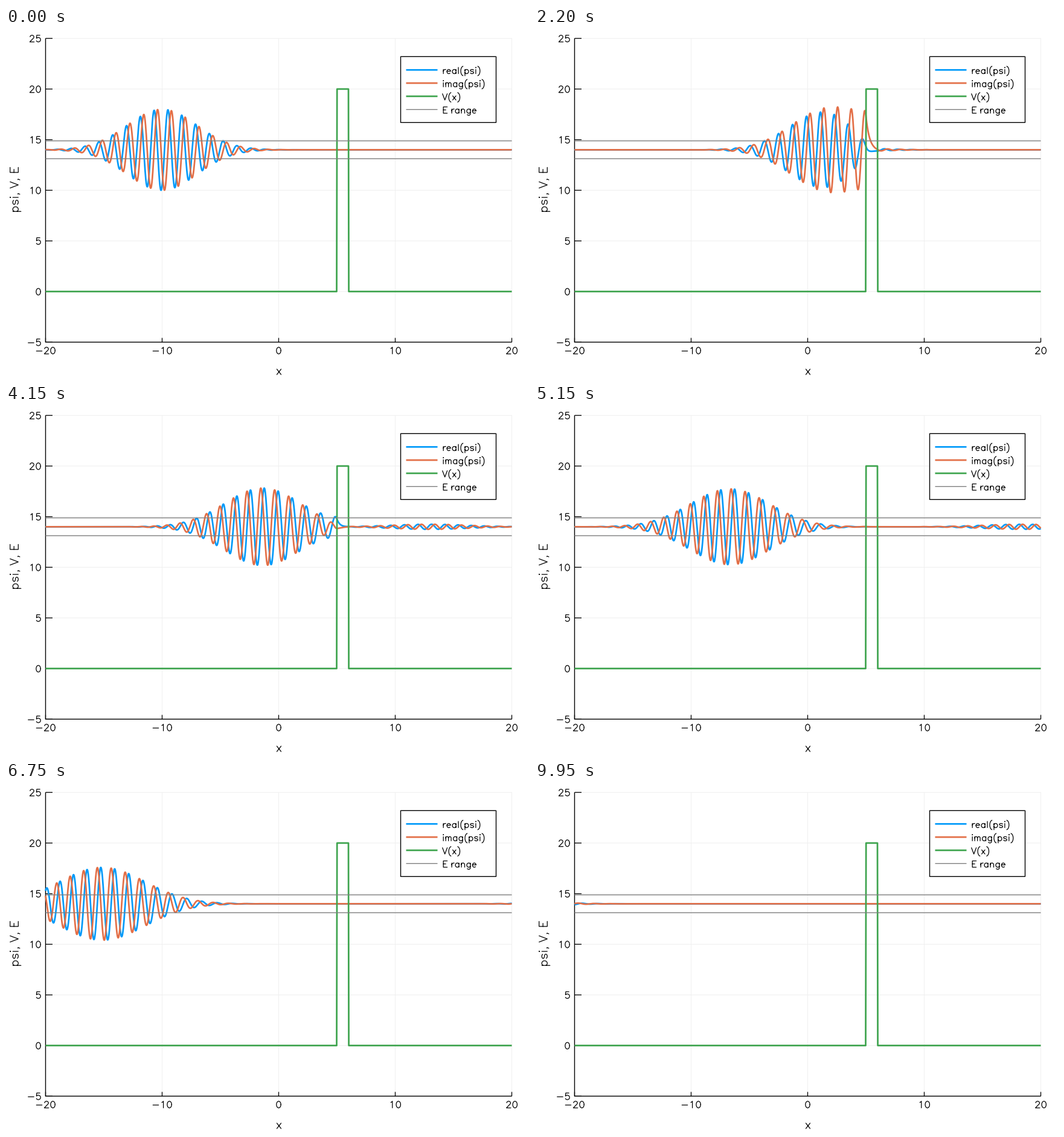
A matplotlib script for the animation above (10000 ms loop, 866 by 577 pixels).

```python
import numpy as np
import matplotlib.pyplot as plt
from matplotlib.animation import FuncAnimation
from matplotlib.patches import Rectangle

plt.rcParams["path.snap"] = False   # keep sub-pixel positions

W, H, DPI = 866, 577, 64
PX = 72 / DPI                       # points per pixel
LEFT, RIGHT, TOP, BOTTOM = 65.5, 837.5, 17.2, 519.4
BLUE, ORANGE, GREEN, GRAY = "#009afa", "#e36f47", "#3ea44e", "#808080"
TICK, LEGEND, GUIDE = 0.525, 0.497, 0.645   # lettering scales
FRAMES, STEP_MS, DT = 200, 50, 0.05

# physics, with hbar = m = 1
E0, V0, B0, B1 = 14, 20, 5, 6
START, SIGMA, AMP = -10, 3, 4
K0 = np.sqrt(2 * E0)
E_SPREAD = K0 / (2 * SIGMA)


# --- single-stroke lettering: baseline 0, x-height 14, cap height 21 ---
def line(*pts):
    return np.array(pts, float)


def arc(cx, cy, rx, ry, a0, a1):
    a = np.radians(np.linspace(a0, a1, 25))
    return np.column_stack([cx + rx * np.cos(a), cy + ry * np.sin(a)])


def join(*parts):
    return np.vstack(parts)


STEM = line((4, 14), (4, 0))
BOWL = arc(9.5, 7, 6.5, 7, 32, 328)

# character: (advance, strokes)
GLYPHS = {
    " ": (9, []),
    "0": (20, [arc(10, 10.5, 7, 10.5, 0, 360)]),
    "1": (20, [line((6, 17), (8, 18), (11, 21), (11, 0))]),
    "2": (20, [join(arc(10, 15.5, 6, 5.5, 175, -35), line((3, 0), (17, 0)))]),
    "5": (20, [join(line((15, 21), (5, 21), (4, 12)),
                    arc(10, 7, 7, 7, 140, -150))]),
    "-": (26, [line((4, 9), (22, 9))]),
    ",": (10, [line((4.5, 1), (5.5, 1), (5.5, -1), (4, -4))]),
    "(": (14, [arc(13, 9, 9, 16, 100, 260)]),
    ")": (14, [arc(1, 9, 9, 16, 80, -80)]),
    "a": (19, [line((15, 14), (15, 0)), BOWL]),
    "e": (18, [join(line((3, 8), (15, 8)), arc(9, 7, 6, 7, 8, 312))]),
    "g": (19, [join(line((15, 14)), arc(9.5, -2, 5.5, 5, 0, -150)), BOWL]),
    "i": (8, [STEM, arc(4, 20.3, 0.7, 0.7, 0, 360)]),
    "l": (8, [line((4, 21), (4, 0))]),
    "m": (26, [STEM, join(arc(8.5, 9, 4.5, 5, 180, 0), line((13, 0))),
               join(arc(17.5, 9, 4.5, 5, 180, 0), line((22, 0)))]),
    "n": (19, [STEM, join(arc(9.5, 8.5, 5.5, 5.5, 180, 0), line((15, 0)))]),
    "p": (19, [line((4, 14), (4, -7)), arc(9.5, 7, 6.5, 7, 148, -148)]),
    "r": (13, [STEM, arc(11, 8, 7, 6, 180, 80)]),
    "s": (17, [join(arc(8.5, 10.7, 5.5, 3.3, 20, 250),
                    arc(8.5, 3.7, 5.5, 3.7, 70, -160))]),
    "x": (17, [line((3, 14), (14, 0)), line((14, 14), (3, 0))]),
    "E": (19, [line((17, 21), (4, 21), (4, 0), (17, 0)),
               line((4, 11), (12, 11))]),
    "V": (18, [line((1, 21), (9, 0), (17, 21))]),
}


def text(x, y, s, scale, align=0.0, upright=False):
    """Draw s with its baseline at (x, y); align 0 left, 0.5 centre, 1 right."""
    pos = -align * sum(GLYPHS[c][0] for c in s)
    pts = []
    for c in s:
        advance, strokes = GLYPHS[c]
        for part in strokes:
            pts += [part + (pos, 0), [(np.nan, np.nan)]]
        pos += advance
    u, v = np.vstack(pts).T * scale
    xs, ys = (x - v, y - u) if upright else (x + u, y - v)
    ax.plot(xs, ys, color="black", lw=1.25 * PX, solid_capstyle="round",
            solid_joinstyle="round", zorder=6)


# --- plot coordinates to pixels ---
def sx(x):
    return LEFT + (np.asarray(x) + 20) * (RIGHT - LEFT) / 40


def sy(y):
    return BOTTOM - (np.asarray(y) + 5) * (BOTTOM - TOP) / 30


def stroke(xs, ys, color, width, z):
    return ax.plot(xs, ys, color=color, lw=width * PX, zorder=z,
                   solid_capstyle="butt", solid_joinstyle="round")[0]


def packet():
    """Wave packet at the barrier, summed over scattering states."""
    k = np.linspace(K0 - 1.5, K0 + 1.5, 301)
    q = np.sqrt(2 * V0 - k**2 + 0j)
    width = B1 - B0
    inner = np.cosh(q * width) - 1j * k / q * np.sinh(q * width)
    slope = -q * np.sinh(q * width) + 1j * k * np.cosh(q * width)
    arrive = np.exp(1j * k * B0)
    passed = 2 * arrive / (inner + slope / (1j * k))
    bounced = passed * inner - arrive

    col = x[:, None]
    u = np.clip(col, B0, B1) - B1
    states = np.where(
        col < B0,
        np.exp(1j * k * col) + bounced * np.exp(-1j * k * (col - B0)),
        np.where(col > B1,
                 passed * np.exp(1j * k * (col - B1)),
                 passed * (np.cosh(q * u) + 1j * k / q * np.sinh(q * u))))
    d = k - K0
    weight = (AMP * SIGMA / np.sqrt(2 * np.pi) * (k[1] - k[0])
              * np.exp(-(SIGMA * d)**2 / 2 - 1j * d * START))
    t = np.arange(FRAMES) * DT
    return states @ (weight[:, None] * np.exp(-0.5j * k[:, None]**2 * t))


fig = plt.figure(figsize=(W / DPI, H / DPI), dpi=DPI, facecolor="white")
ax = fig.add_axes([0, 0, 1, 1])
ax.set_xlim(0, W)
ax.set_ylim(H, 0)
ax.axis("off")

# grid, ticks and tick labels
for v in range(-20, 21, 10):
    p = sx(v)
    if v > -20:
        stroke([p, p], [TOP, BOTTOM], "#efefef", 1, 0)
    stroke([p, p], [BOTTOM, BOTTOM - 7], "black", 1.3, 1)
    text(p, 538.8, str(v), TICK, 0.5)
for v in range(-5, 26, 5):
    p = sy(v)
    if v > -5:
        stroke([LEFT, RIGHT], [p, p], "#efefef", 1, 0)
    stroke([LEFT, LEFT + 11.5], [p, p], "black", 1.3, 1)
    text(58.8, p + 5.8, str(v), TICK, 1)
stroke([LEFT, LEFT, RIGHT], [TOP, BOTTOM, BOTTOM], "black", 1.4, 1)
text(452, 573, "x", GUIDE, 0.5)
text(20.3, 267.5, "psi, V, E", GUIDE, 0.5, upright=True)

# curves
x = np.linspace(-20, 20, 2001)
psi = packet()
real = stroke(sx(x), sy(E0 + psi[:, 0].real), BLUE, 2.7, 2)
imag = stroke(sx(x), sy(E0 + psi[:, 0].imag), ORANGE, 2.7, 3)
stroke(sx([-20, 4.975, 5.01, 5.985, 6.015, 20]),
       sy([0, 0, V0, V0, 0, 0]), GREEN, 2.7, 4)
for e in (E0 - E_SPREAD, E0 + E_SPREAD):
    stroke([LEFT, RIGHT], sy([e, e]), GRAY, 1.4, 5)

# legend
ax.add_patch(Rectangle((653.5, 47.3), 158, 109, fc="white", ec="black",
                       lw=1.4 * PX, zorder=5))
ENTRIES = [("real(psi)", BLUE, 2.7), ("imag(psi)", ORANGE, 2.7),
           ("V(x)", GREEN, 2.7), ("E range", GRAY, 1.4)]
for i, (label, color, width) in enumerate(ENTRIES):
    y = 69.3 + 21.8 * i
    stroke([662.5, 714.5], [y, y], color, width, 6)
    text(722.2, y + 6.2, label, LEGEND)


def update(n):
    real.set_ydata(sy(E0 + psi[:, n].real))
    imag.set_ydata(sy(E0 + psi[:, n].imag))
    return real, imag


anim = FuncAnimation(fig, update, frames=FRAMES, interval=STEP_MS,
                     repeat=True, repeat_delay=0)
plt.show()
```
